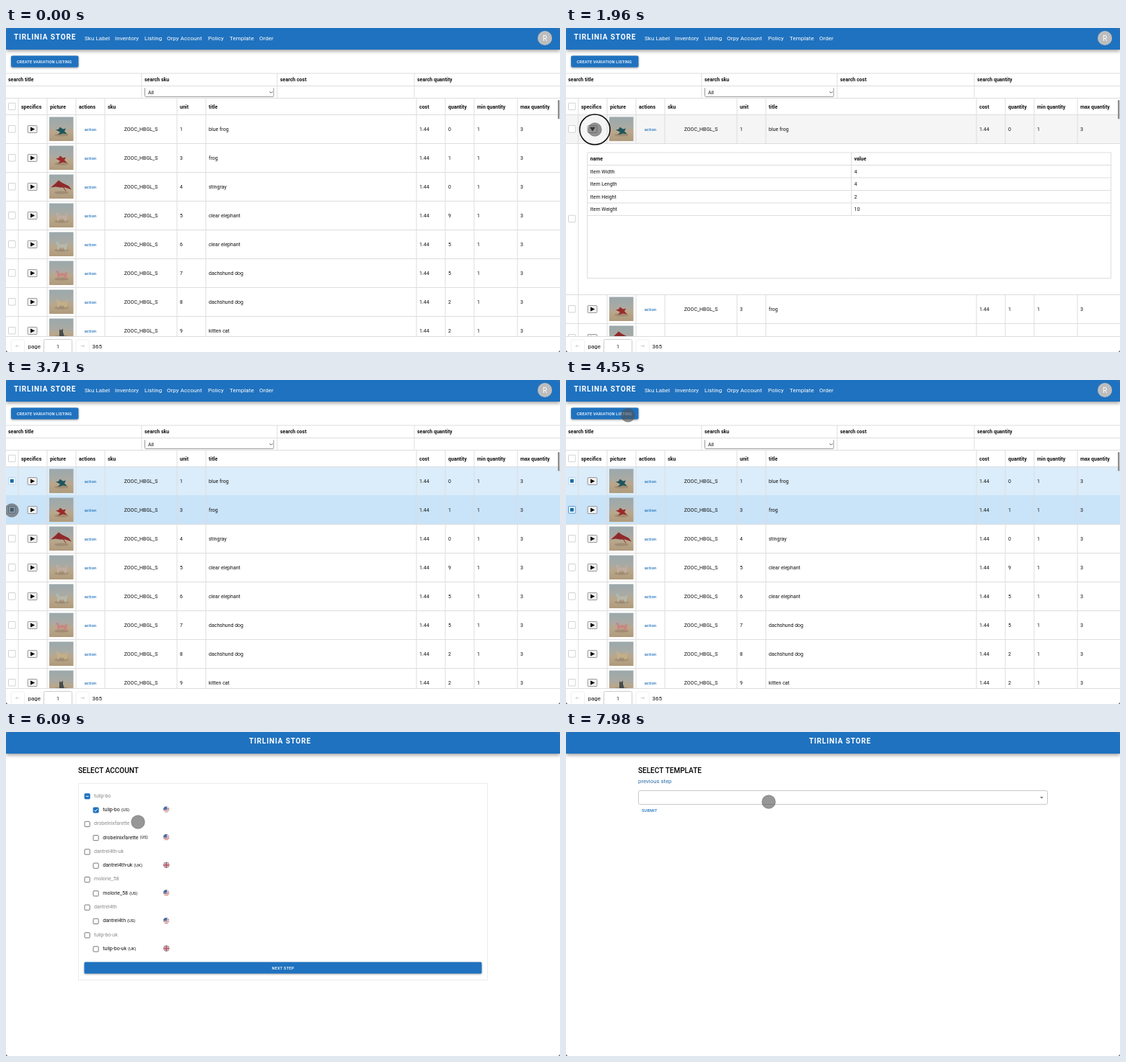
These frames come from a looping animation (768x450 px, 8000 ms). An HTML page with a canvas:

```html
<!DOCTYPE html>
<html lang="en">
<head>
<meta charset="utf-8">
<title>Store listing</title>
<style>
  html, body { margin: 0; width: 100%; height: 100%; overflow: hidden; background: #3a3f45; }
  canvas { display: block; width: 768px; height: 450px; }
</style>
</head>
<body>
<canvas id="stage"></canvas>
<script>
const W = 768, H = 450, LOOP = 8000, STEP = 70;
const BLUE = '#1f72bf', LINE = '#dddddd', INK = '#111111';
const STORE = 'TIRLINIA STORE';
const canvas = document.getElementById('stage');
const ctx = canvas.getContext('2d');
const dpr = window.devicePixelRatio || 1;
canvas.width = W * dpr;
canvas.height = H * dpr;

const nav = [['Sku Label', 109], ['Inventory', 151], ['Listing', 192], ['Orpy Account', 223],
  ['Policy', 280], ['Template', 310], ['Order', 351]];
const searches = [['title', 3], ['sku', 192], ['cost', 380], ['quantity', 570]];
const columns = [['specifics', 17], ['picture', 57], ['actions', 97], ['sku', 137], ['unit', 237],
  ['title', 277], ['cost', 569], ['quantity', 609], ['min quantity', 649], ['max quantity', 709]];
const items = [
  [1, 'blue frog', 0, 'frog', '#1f555c'], [3, 'frog', 1, 'frog', '#9a2b2b'],
  [4, 'stingray', 0, 'ray', '#8f2a2a'], [5, 'clear elephant', 9, 'beast', '#c4aea2'],
  [6, 'clear elephant', 5, 'beast', '#b5bdb2'], [7, 'dachshund dog', 5, 'beast', '#cc8080'],
  [8, 'dachshund dog', 2, 'beast', '#c8b183'], [9, 'kitten cat', 2, 'cat', '#454a4c']
];
const specs = [['Item Width', 4], ['Item Length', 4], ['Item Height', 2], ['Item Weight', 10]];
const accounts = [['tulip-bo', 'US'], ['drobelnixfarette', 'US'], ['dantrel4th-uk', 'UK'],
  ['molorie_58', 'US'], ['dantrel4th', 'US'], ['tulip-bo-uk', 'UK']];

const linear = p => p, smooth = p => p * p * (3 - 2 * p);
const easeIn = p => p * p, easeOut = p => p * (2 - p);
// time, x, y, easing of the way to this point
const path = [
  [210, 294, 365], [1050, 40, 141, smooth], [2030, 40, 141, linear], [2660, 8, 141, smooth],
  [2800, 8, 141, linear], [3360, 8, 181, smooth], [3780, 8, 181, linear], [4550, 86, 49, smooth],
  [4620, 102, 49, linear], [4970, 135, 60, linear], [5600, 124, 108, smooth], [5710, 124, 108, linear],
  [6090, 183, 125, easeIn], [6510, 281, 332, easeOut], [7490, 281, 332, linear], [7980, 281, 97, smooth]
];
const clicks = [[1330, 1540], [1960, 2100], [2660, 2800], [3570, 3710], [5600, 5740], [6580, 6720]];

function text(s, x, y, size = 7, color = INK, weight = 400, align = 'left', spacing = 0, family = 'Roboto') {
  ctx.font = `${weight} ${size}px ${family}, sans-serif`;
  ctx.letterSpacing = spacing + 'px';
  ctx.textAlign = align;
  ctx.fillStyle = color;
  ctx.fillText(s, x, y);
}

function rect(x, y, w, h, color) {
  ctx.fillStyle = color;
  ctx.fillRect(x, y, w, h);
}

function box(x, y, w, h, r, fill, stroke, width = 1) {
  ctx.beginPath();
  ctx.roundRect(x, y, w, h, r);
  if (fill) { ctx.fillStyle = fill; ctx.fill(); }
  if (stroke) { ctx.strokeStyle = stroke; ctx.lineWidth = width; ctx.stroke(); }
}

const hline = (y, x0 = 0, x1 = W, color = LINE) => rect(x0, y, x1 - x0, 1, color);
const vline = (x, y0, y1, color = LINE) => rect(x, y0, 1, y1 - y0, color);

function poly(points, color) {
  ctx.beginPath();
  points.forEach(([x, y]) => ctx.lineTo(x, y));
  ctx.closePath();
  ctx.fillStyle = color;
  ctx.fill();
}

function disc(x, y, r, color) {
  ctx.beginPath();
  ctx.arc(x, y, r, 0, Math.PI * 2);
  ctx.fillStyle = color;
  ctx.fill();
}

function stroke(points, color, width) {
  ctx.beginPath();
  points.forEach(([x, y]) => ctx.lineTo(x, y));
  ctx.strokeStyle = color;
  ctx.lineWidth = width;
  ctx.stroke();
}

function shadowed(draw, blur, dy, color) {
  ctx.save();
  ctx.shadowColor = color;
  ctx.shadowBlur = blur * dpr;
  ctx.shadowOffsetY = dy * dpr;
  draw();
  ctx.restore();
}

function appBar(full) {
  shadowed(() => rect(0, 0, W, 30, BLUE), 5, 2, 'rgba(0,0,0,.4)');
  if (!full) {
    text(STORE, W / 2 - 4, 15.7, 10, '#fff', 700, 'center', 0.85);
    return;
  }
  text(STORE, 11, 15.7, 10, '#fff', 700, 'left', 0.85);
  nav.forEach(([s, x]) => text(s, x, 17.3, 8, '#fff', 400, 'left', 0.05));
  disc(747, 14, 10, '#bdbdbd');
  text('R', 747, 17.7, 10, '#fff', 400, 'center');
}

function photo(x, y, kind, color) {
  ctx.save();
  ctx.translate(x, y);
  const g = ctx.createLinearGradient(0, 0, 0, 33.5);
  g.addColorStop(0, '#9ba8ab');
  g.addColorStop(0.42, '#a9aaa4');
  g.addColorStop(0.62, '#b9a78c');
  g.addColorStop(1, '#af9a7b');
  rect(0, 0, 33.5, 33.5, g);
  ctx.globalAlpha = 0.25;
  ctx.beginPath();
  ctx.ellipse(17, 25, 10, 2, 0, 0, 7);
  ctx.fillStyle = '#5b4a38';
  ctx.fill();
  ctx.globalAlpha = kind === 'beast' ? 0.85 : 1;
  if (kind === 'frog') {
    poly([[9, 18], [13, 17], [15, 14], [19, 17], [23, 16], [21, 20], [25, 24], [19, 23], [12, 25], [15, 21]], color);
  } else if (kind === 'ray') {
    poly([[2, 18], [9, 12], [13, 8], [17, 11], [27, 16], [31, 21], [22, 18], [15, 18], [9, 17]], color);
    stroke([[19, 17], [23, 23]], color, 1);
  } else if (kind === 'cat') {
    poly([[14, 14], [15, 16], [17, 16], [19, 14], [19, 19], [21, 25], [20, 28], [14, 28], [14, 20]], color);
  } else {
    poly([[9, 14], [12, 13], [14, 17], [22, 17], [25, 14], [24, 25], [21, 25], [20, 21], [14, 21], [13, 25], [11, 25], [11, 18]], color);
  }
  ctx.restore();
}

function gridCheck(cy, on, focus) {
  box(3.5, cy - 4.8, 9.5, 9.5, 0.5, '#fff', focus ? '#4f96d0' : on ? '#b9d5eb' : '#d2d2d2');
  if (on) rect(5.7, cy - 2.6, 5, 5, '#156aa8');
}

function gridRow(item, y, bg, open, on, focus) {
  const [unit, title, qty, kind, color] = item, base = y + 23;
  if (bg) rect(0, y, W, 40, bg);
  hline(y + 40);
  columns.forEach(c => vline(c[1] - 0.5, y, y + 40));
  gridCheck(y + 20.3, on, focus);
  box(30, y + 15.5, 13, 10, 1, '#f0f0f0', '#858585', 0.8);
  poly(open ? [[33, y + 17.7], [40.5, y + 17.7], [36.8, y + 23.5]]
            : [[34, y + 17.5], [40, y + 20.5], [34, y + 23.5]], '#000');
  photo(60, y + 3.5, kind, color);
  text('action', 117, base - 0.2, 5.7, BLUE, 500, 'center', 0.15);
  text('ZOOC_HBGL_S', 187, base, 7, INK, 400, 'center');
  [[unit, 241], [title, 281], ['1.44', 573], [qty, 613], [1, 653], [3, 713]]
    .forEach(([s, x]) => text(s, x, base));
}

function details(y, filled) {
  rect(0, y + 1, W, 210, '#fff');
  hline(y + 210);
  vline(16.5, y, y + 210);
  gridCheck(y + 105, false, false);
  if (!filled) return;
  const top = y + 13, pitch = 17.5;
  box(29.5, top, 726, 174.5, 0, '#fff', LINE);
  vline(395, top, top + pitch * 5);
  [['name', 'value'], ...specs].forEach(([a, b], i) => {
    const base = top + 11.2 + i * pitch, weight = i ? 400 : 700;
    hline(top + pitch * (i + 1) - 0.5, 29.5, 755.5);
    text(a, 33.5, base, 7, INK, weight);
    text(b, 399.5, base, 7, INK, weight);
  });
}

function listing(t) {
  shadowed(() => box(7, 38.5, 93.5, 16, 2, BLUE), 3, 1, 'rgba(0,0,0,.4)');
  text('CREATE VARIATION LISTING', 15, 48.8, 5.6, '#fff', 500, 'left', 0.16);

  [62.5, 80, 97].forEach(y => hline(y));
  [187.5, 375.5, 565.5].forEach(x => vline(x, 63, 97));
  searches.forEach(([s, x]) => text('search ' + s, x, 74.3, 7, INK, 700));
  box(192.5, 82.5, 178.5, 13, 1, '#fff', '#9a9a9a');
  rect(192, 80, 180, 3.2, '#fff');
  hline(80);
  text('All', 197, 91.7);
  stroke([[365.3, 88.2], [367.4, 90.3], [369.5, 88.2]], '#444', 0.9);

  const open = t >= 1540 && t < 2100;
  const first = t >= 2800, second = t >= 3710;
  const bgs = [null, second ? '#c9e3f8' : null];
  if (first) bgs[0] = second ? '#dbecfa' : '#c9e3f8';
  else if (t >= 1540) bgs[0] = '#f5f5f5';

  ctx.save();
  ctx.beginPath();
  ctx.rect(0, 97, W, 331);
  ctx.clip();
  items.forEach((item, i) => {
    const y = 120 + 40 * i + (open && i ? 210 : 0);
    if (y > 428) return;
    gridRow(item, y, bgs[i], open && !i, i ? i === 1 && second : first, i ? i === 1 && second : first && !second);
  });
  if (open) details(160, t >= 1610);
  ctx.restore();

  hline(120);
  gridCheck(109, false, false);
  columns.forEach(([s, x]) => {
    vline(x - 0.5, 98, 120);
    text(s, x + 4, 111.6, 7, INK, 700);
  });
  box(765, 100, 2.4, 26.5, 1.2, '#8d8d8d');

  hline(428);
  [16, 106].forEach(x => box(x - 9, 433, 18.5, 20, 2, '#fff', '#efefef'));
  text('←', 16, 444, 7, '#b5b5b5', 400, 'center', 0, 'DejaVu Sans');
  text('→', 106, 444, 7, '#b5b5b5', 400, 'center', 0, 'DejaVu Sans');
  text('page', 30.5, 444.7, 8);
  box(52.5, 432.5, 39, 22, 2, '#fff', '#cccccc');
  text('1', 72, 444.8, 7, INK, 400, 'center');
  text('365', 119.5, 444.7, 8);
}

function nextButton(y, enabled) {
  const draw = () => box(108.5, y, 551, 16, 1.5, enabled ? BLUE : '#e3e3e3', enabled ? null : '#d4d4d4', 0.8);
  if (enabled) shadowed(draw, 2.5, 1, 'rgba(0,0,0,.35)'); else draw();
  text('NEXT STEP', 384, y + 10.1, 5.6, enabled ? '#fff' : '#a5a5a5', 500, 'center', 0.2);
}

function formCheck(x, cy, state) {
  box(x, cy - 3.6, 7.2, 7.2, 1, state ? BLUE : '#fff', state ? BLUE : '#6a6a6a', 0.9);
  if (state === 'some') stroke([[x + 1.6, cy], [x + 5.6, cy]], '#fff', 1);
  if (state === 'on') stroke([[x + 1.3, cy], [x + 2.9, cy + 1.7], [x + 6, cy - 1.7]], '#fff', 1);
}

function flag(x, y, uk) {
  ctx.save();
  ctx.beginPath();
  ctx.arc(x, y, 4.1, 0, 7);
  ctx.clip();
  if (uk) {
    rect(x - 5, y - 5, 10, 10, '#45517e');
    for (const [color, w] of [['#e6dfe0', 2], ['#b5505a', 0.8]]) {
      stroke([[x - 5, y - 4], [x + 5, y + 4]], color, w);
      stroke([[x - 5, y + 4], [x + 5, y - 4]], color, w);
    }
    for (const [color, w] of [['#e6dfe0', 2.8], ['#b5505a', 1.6]]) {
      rect(x - 5, y - w / 2, 10, w, color);
      rect(x - w / 2, y - 5, w, 10, color);
    }
  } else {
    for (let i = 0; i < 7; i++) rect(x - 5, y - 4.2 + i * 1.2, 10, 1.2, i % 2 ? '#f0e6e6' : '#bd6468');
    rect(x - 5, y - 5, 5.6, 5.2, '#3f6ea8');
  }
  ctx.restore();
}

function accountPage(t) {
  if (t >= 4760) {
    const loaded = t >= 5180, picked = t >= 5740;
    text('SELECT ACCOUNT', 100, 56.5, 10, '#000', 500);
    box(100.5, 71.5, 567, loaded ? 273 : 41, 0, '#fff', '#ececec');
    nextButton(loaded ? 319.5 : 88, picked);
    if (loaded) accounts.forEach(([name, land], i) => {
      const y = 89.3 + 38.6 * i, mine = picked && !i;
      formCheck(109, y, mine && 'some');
      text(name, 122, y + 1.2, 7, '#8a8a8a');
      formCheck(121, y + 19.2, mine && 'on');
      text(name, 134.3, y + 20.7);
      const w = ctx.measureText(name).width;
      text(`(${land})`, 136.3 + w, y + 20.5, 5.9);
      flag(222.3, y + 18.3, land === 'UK');
    });
  }
  if (t < 5250) {
    shadowed(() => box(-2, 436, 256, 20, 4, '#eceeee', '#d2d4d4'), 4, 0, 'rgba(0,0,0,.2)');
    text('Waiting for firebasestorage.googleapis.c...', 4, 451, 11.6, '#8b8d8d', 400, 'left', 0.1, 'Inter');
  }
}

function templatePage() {
  text('SELECT TEMPLATE', 100, 56.5, 10, '#000', 500);
  text('previous step', 100, 71.2, 7.8, '#2c6dad');
  box(100.5, 81.5, 567, 19, 2, '#fff', '#c8c8c8');
  poly([[657, 90], [661.8, 90], [659.4, 92.5]], '#777');
  text('SUBMIT', 105, 111, 5.6, BLUE, 500, 'left', 0.2);
}

function cursorAt(t) {
  let i = 1;
  while (i < path.length - 1 && path[i][0] < t) i++;
  const [t0, x0, y0] = path[i - 1], [t1, x1, y1, ease] = path[i];
  const p = ease(Math.min(1, Math.max(0, (t - t0) / (t1 - t0))));
  return [x0 + (x1 - x0) * p, y0 + (y1 - y0) * p];
}

function cursor(t) {
  if (t < path[0][0]) return;
  const [x, y] = cursorAt(t);
  disc(x, y, 9.6, 'rgba(82,82,82,.6)');
  ctx.beginPath();
  ctx.arc(x, y, 9.2, 0, 7);
  ctx.strokeStyle = 'rgba(70,70,70,.3)';
  ctx.lineWidth = 0.8;
  ctx.stroke();
  if (clicks.some(([a, b]) => t >= a && t < b)) {
    ctx.beginPath();
    ctx.arc(x, y, 21, 0, 7);
    ctx.strokeStyle = '#0a0a0a';
    ctx.lineWidth = 1.5;
    ctx.stroke();
  }
}

function draw(t) {
  ctx.setTransform(dpr, 0, 0, dpr, 0, 0);
  rect(0, 0, W, H, '#3a3f45');
  ctx.save();
  ctx.beginPath();
  ctx.roundRect(0, 0, W, H, 3.5);
  ctx.clip();
  rect(0, 0, W, H, '#fff');
  const list = t < 4620;
  if (list) listing(t);
  else if (t < 6860) accountPage(t);
  else templatePage();
  appBar(list);
  cursor(t);
  ctx.restore();
}

function tick() {
  const t = performance.now() % LOOP;
  draw(Math.floor(t / STEP) * STEP);
  requestAnimationFrame(tick);
}
tick();
</script>
</body>
</html>
```
